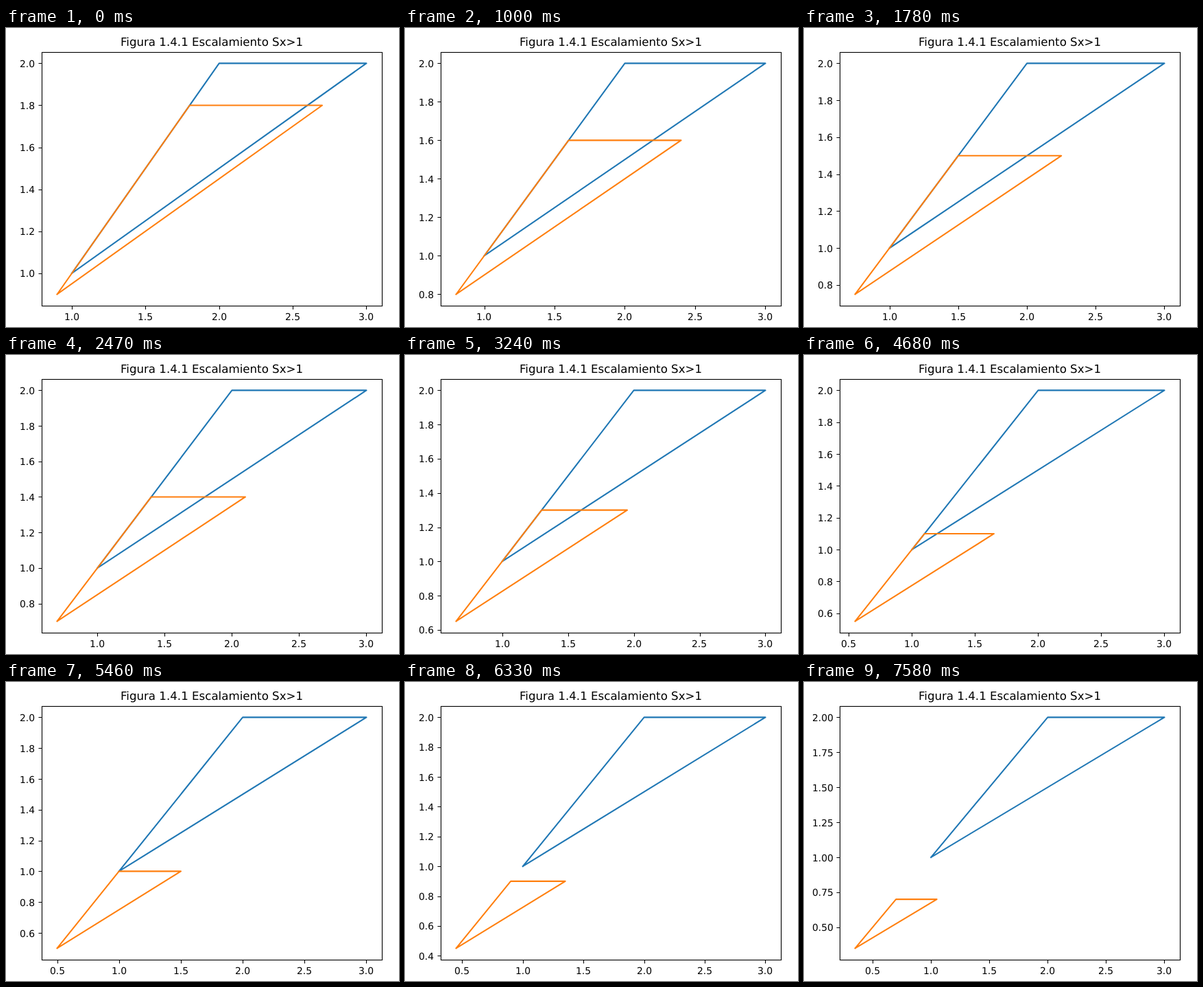
Animation of 573x435 px, one loop 8 s. Source, as an HTML page:

```html
<!DOCTYPE html>
<html lang="es">
<head>
<meta charset="utf-8">
<title>Escalamiento</title>
<style>
  html, body { margin: 0; width: 100%; height: 100%; overflow: hidden; background: #fff; }
  svg { display: block; }
  text { font: 13.889px "DejaVu Sans", sans-serif; fill: #000; text-rendering: geometricPrecision; }
  .title { font-size: 16.667px; text-anchor: middle; }
  .axis { fill: none; stroke: #000; stroke-width: 1.11; }
  .shape { fill: none; stroke-width: 2.083; stroke-linejoin: round; stroke-linecap: square; }
</style>
</head>
<body>
<svg width="573" height="435" viewBox="0 0 573 435">
  <rect width="573" height="435" fill="#fff"/>
  <path id="base" class="shape" stroke="#1f77b4"/>
  <path id="scaled" class="shape" stroke="#ff7f0e"/>
  <path id="ticks" class="axis"/>
  <rect class="axis" x="52.5" y="35.5" width="496" height="369"/>
  <g id="labels"></g>
  <text class="title" x="300" y="26">Figura 1.4.1 Escalamiento Sx&gt;1</text>
</svg>
<script>
const LOOP = 8000;
const STEPS = [0, 320, 1000, 1780, 2470, 3240, 3960, 4680, 5460, 6330, 6920, 7580];
const TRIANGLE = [[1, 1], [3, 2], [2, 2], [1, 1]];
const BOX = { left: 52, right: 548, top: 34.6, bottom: 404.2 };
const FONT = 13.889;
const byId = id => document.getElementById(id);

// Linear axis with a 5% margin on both sides of the data.
function makeAxis(lo, hi, from, to) {
  const pad = (hi - lo) * 0.05;
  const min = lo - pad, max = hi + pad;
  return { min, max, at: v => from + (v - min) / (max - min) * (to - from) };
}

// Smallest round step that leaves at most nine intervals.
function tickValues({ min, max }) {
  const step = [0.2, 0.25, 0.5].find(s => s >= (max - min) / 9);
  const values = [];
  for (let i = Math.ceil(min / step); i * step <= max; i++) values.push(i * step);
  return { values, digits: step === 0.25 ? 2 : 1 };
}

const labelWidth = s => FONT * (0.636 * (s.length - 1) + 0.318);
const label = (x, y, s) => `<text x="${Math.round(x)}" y="${y}">${s}</text>`;

function draw(scale) {
  const x = makeAxis(scale, 3, BOX.left, BOX.right);
  const y = makeAxis(scale, 2, BOX.bottom, BOX.top);
  const outline = k => "M" + TRIANGLE.map(([a, b]) =>
    x.at(a * k).toFixed(2) + " " + y.at(b * k).toFixed(2)).join("L");
  byId("base").setAttribute("d", outline(1));
  byId("scaled").setAttribute("d", outline(scale));

  let ticks = "", labels = "";
  const xt = tickValues(x), yt = tickValues(y);
  for (const v of xt.values) {
    const px = x.at(v), s = v.toFixed(xt.digits);
    ticks += `M${Math.round(px) + 0.5} 404.5v5`;
    labels += label(px - labelWidth(s) / 2, 425, s);
  }
  for (const v of yt.values) {
    const py = y.at(v), s = v.toFixed(yt.digits);
    ticks += `M52.5 ${Math.round(py) + 0.5}h-5`;
    labels += label(42.5 - labelWidth(s), Math.round(py + 5.5), s);
  }
  byId("ticks").setAttribute("d", ticks);
  byId("labels").innerHTML = labels;
}

let shown = -1;
function frame() {
  const t = performance.now() % LOOP;
  const step = STEPS.filter(s => s <= t).length - 1;
  if (step !== shown) {
    shown = step;
    draw((90 - 5 * step) / 100);
  }
  requestAnimationFrame(frame);
}
frame();
</script>
</body>
</html>
```
